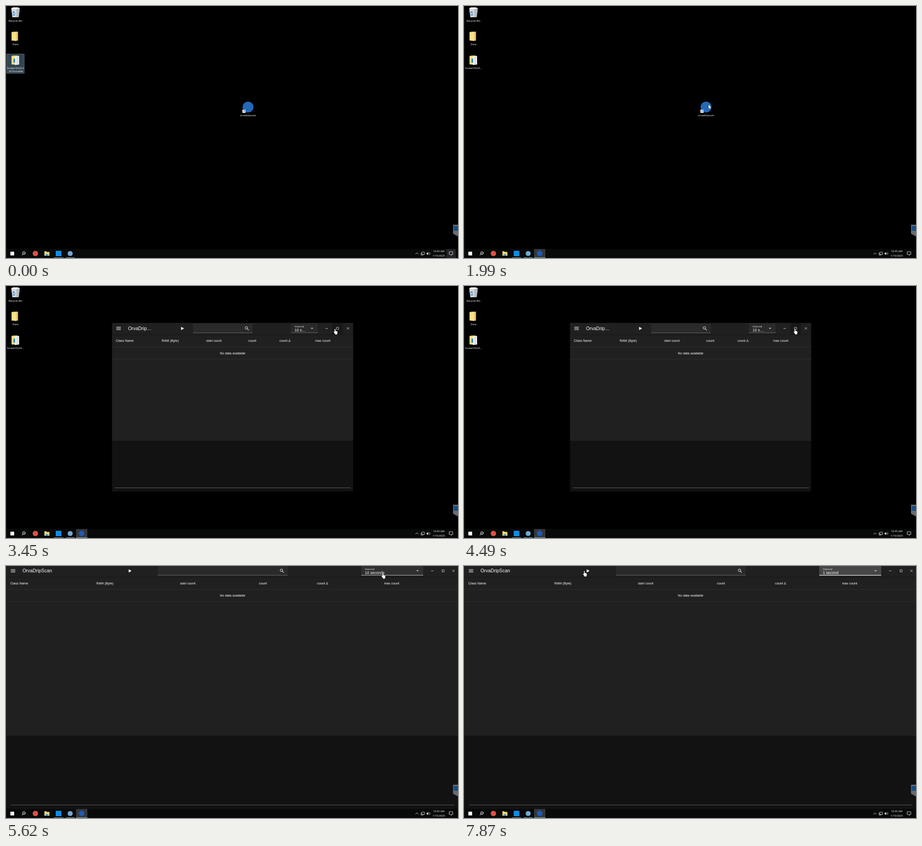
An HTML page with a canvas that plays this animation: 1000 by 560 pixels, repeating every 8000 ms.

```html
<!DOCTYPE html>
<html lang="en">
<head>
<meta charset="utf-8">
<title>Desktop app launch</title>
<style>
html, body { margin: 0; width: 100%; height: 100%; overflow: hidden; background: #000; }
canvas { display: block; }
</style>
</head>
<body>
<canvas id="stage" width="1000" height="560"></canvas>
<script>
const g = document.getElementById('stage').getContext('2d');
const LOOP = 8000;
const UI = '"Open Sans", "Noto Sans", sans-serif';
const APP = '"Liberation Sans", Arial, sans-serif';
const SURFACE = '#202020', BACK = '#121212', FIELD = '#2a2a2a', RULE = '#3a3a3a';
const NAME = 'OrvaDripScan';

const SMALL = {
  left: 1, right: 534.5, body: 260.5, bottom: 373, line: [7, 529.5, 365],
  cols: [9.5, 111, 209.5, 302.5, 371.5, 450.5], mid: 268,
  title: 'OrvaDrip…', play: 157, search: [180.5, 312], select: [397, 456], buttons: [476, 500, 523]
};
const WIDE = {
  left: 1, right: 1000, body: 377, bottom: 540, line: [11, 992, 531],
  cols: [9.5, 200, 385, 559.5, 688, 836.5], mid: 501.5,
  title: NAME, play: 274.5, search: [336, 623], select: [786, 923], buttons: [943, 967, 990]
};
const HEADS = ['Class Name', 'RAM (Byte)', 'start count', 'count', 'count Δ', 'max count'];
const CHOICES = ['1 second', '5 seconds', '10 seconds', '30 seconds', '60 seconds'];

// Pointer moves: [time, x, y]
const MOVES = [
  [[120, 955, 560], [400, 765, 420], [700, 510, 236], [890, 541, 219]],
  [[2720, 541, 219], [3000, 645.5, 153], [3250, 706, 112], [3510, 729, 94]],
  [[4170, 729, 94], [4230, 732, 95]],
  [[5140, 732, 95], [5450, 800, 40], [5750, 846, 7]],
  [[6250, 846, 7], [6680, 851, 34]],
  [[6860, 851, 34], [7150, 620, 24], [7520, 330, 14]],
  [[7620, 330, 14], [7750, 290, 17], [7870, 266, 11]]
];
const CLICKS = [[1230, 1310], [1400, 1480], [4390, 4490], [5930, 6020], [6730, 6780]];

const ARROW = new Path2D('M0 0V16.5L3.8 12.9 6.3 18.7 8.8 17.6 6.3 12H11.6Z');
const HAND = new Path2D('M6 .5c1.2 0 2 .8 2 2V8l6 1.5c1.6.4 2.5 1.3 2.5 3v3c0 2-1 3-1.5 4.5v2.5H7V21C5.5 19 3 16 1 13c-.8-1.5.8-2.6 2-1.6L4.5 13V2.5c0-1.2.5-2 1.5-2z');

const between = (t, a, b) => t >= a && t < b;
const clamp = v => Math.max(0, Math.min(1, v));
const ease = v => { v = clamp(v); return v * v * (3 - 2 * v); };

function rect(x, y, x2, y2, fill) {
  g.fillStyle = fill;
  g.fillRect(x, y, x2 - x, y2 - y);
}
function disc(x, y, r, fill) {
  g.fillStyle = fill;
  g.beginPath();
  g.arc(x, y, r, 0, 7);
  g.fill();
}
function poly(pts, fill) {
  g.fillStyle = fill;
  g.beginPath();
  for (let i = 0; i < pts.length; i += 2) g.lineTo(pts[i], pts[i + 1]);
  g.closePath();
  g.fill();
}
function stroke(path, color = '#fff', width = 0.8) {
  g.strokeStyle = color;
  g.lineWidth = width;
  g.stroke(new Path2D(path));
}
// y is the visual middle of the line
function text(s, x, y, size, font = APP, align = 'left', fill = '#fff', gap = 0) {
  g.font = size + 'px ' + font;
  g.letterSpacing = gap + 'px';
  g.textAlign = align;
  g.fillStyle = fill;
  g.fillText(s, x, y + size * 0.35);
}
const label = (s, x, y) => text(s, x, y, 5.9, UI, 'center');

function lens(x, y, r, color) {
  stroke(`M${x + r} ${y}A${r} ${r} 0 1 1 ${x - r} ${y}A${r} ${r} 0 1 1 ${x + r} ${y}`, color, 1.1);
}

function folder(x, y) {
  poly([x, y + 1, x + 5, y, x + 14, y, x + 14, y + 20, x, y + 20], '#e8c765');
  poly([x, y + 1, x + 10, y + 2, x + 10, y + 21, x, y + 19], '#fbe08c');
}

function bin() {
  poly([11.5, 5, 30.5, 5, 28, 25, 14, 25], '#d4d8db');
  poly([11.5, 5, 16, 3, 26, 3, 30.5, 5, 26, 7, 16, 7], '#f4f5f6');
  poly([23, 7, 30.5, 5, 28, 25, 23, 25], '#b4babf');
  stroke('M14.5 16.5l2.5-4 2.5 3M20 17.5l-2.3 3.3-3-1.8', '#2a83d0', 1.6);
}

function highlight(x, y, x2, y2) {
  rect(x, y, x2, y2, '#344450');
  g.strokeStyle = '#708491';
  g.lineWidth = 0.6;
  g.strokeRect(x + 0.3, y + 0.3, x2 - x - 0.6, y2 - y - 0.6);
}

function desktop(t) {
  rect(0, 0, 1000, 560, '#000');
  bin();
  label('Recycle Bin', 21, 32.5);
  folder(12.5, 57);
  label('Data', 21, 85);
  const picked = t < 1230;
  if (picked) highlight(1.5, 106.5, 40.5, 150);
  folder(12.5, 110);
  poly([20, 112, 29, 111, 29, 130, 20, 131], '#eef2f4');
  rect(16.5, 117, 20, 126, '#2b87d8');
  stroke('M23.5 115h3M23.5 119h3M23.5 123h3M23.5 127h3', '#7b8790', 0.9);
  if (picked) {
    label('ScreenToGif.2', 21, 137.7);
    label('.34.Portable', 21, 145.2);
  } else label('ScreenToGif...', 21, 137.7);

  if (between(t, 1230, 1990)) highlight(516, 211, 556, 248);
  disc(535.5, 224.5, 12, '#2468b8');
  rect(523, 230.5, 530, 237.5, '#f4f6f8');
  stroke('M524.7 236.3q0-3 3-3M526 232h2.6v2.6', '#1d5fb5', 0.9);
  label(NAME.toLowerCase(), 535.5, 243);
}

function taskbar(t) {
  rect(0, 540, 1000, 560, '#080909');
  if (t >= 1960) rect(155, 540, 180, 560, '#34373a');
  rect(9.7, 546, 18, 554.3, '#fff');
  lens(39.8, 549, 2.7, '#fff');
  stroke('M37.8 551l-2.7 2.9', '#fff', 1);
  disc(65, 550, 6, '#dd5142');
  poly([85, 545, 89, 545, 90, 546.5, 96, 546.5, 96, 555, 85, 555], '#f7d873');
  rect(87.5, 551, 93.5, 555, '#4aa3df');
  rect(110, 544, 122.5, 556, '#108be6');
  disc(142, 550, 5.6, '#6fa9d8');
  rect(106, 558.8, 126.5, 560, '#6f9dc0');
  rect(132, 558.8, 152, 560, '#6f9dc0');
  if (t >= 1960) {
    disc(167.3, 549.8, 6, '#1d5bb8');
    rect(155, 558.8, 180, 560, '#76a9d0');
  }
  stroke('M906 551.7l3.2-3.2 3.2 3.2', '#fff', 0.9);
  stroke('M919.8 547h6.2v4.8h-6.2zM918.3 548.5v5h4M922.8 552v2', '#ddd', 0.9);
  poly([930.3, 548.7, 932, 548.7, 934, 546.7, 934, 553.5, 932, 551.5, 930.3, 551.5], '#ddd');
  stroke('M935.3 548.3q1.3 1.8 0 3.6M937 547q2.2 3.1 0 6.2', '#ddd', 0.7);
  text('10:45 AM', 957.3, 545.3, 5.8, UI, 'center');
  text('1/15/2025', 957.5, 554.6, 5.7, UI, 'center');
  if (t < 1230) rect(974, 540, 995, 560, '#222324');
  stroke('M980.5 546h8v6h-3v2.3l-2.3-2.3h-2.7z', '#fff', 0.8);
}

function sideTab() {
  poly([990, 486, 1000, 486, 1000, 512, 989, 506, 989, 487], '#686c70');
  rect(990.5, 489, 1000, 499.5, '#174f80');
}

function selectBox(L, state) {
  const [a, b] = L.select, arrow = b - 12.5;
  rect(a, -1, b, 21, state.focus ? '#474747' : state.hover ? '#303030' : FIELD);
  rect(a, 20, b, state.focus ? 21.2 : 20.7, state.focus || state.hover ? '#fff' : '#858585');
  text('Interval', a + 8, 6.6, 6.25, APP, 'left', '#ddd', 0.06);
  text(state.value, a + 8, 14.7, 8.33, APP, 'left', '#fff', 0.078);
  const d = state.open ? -1.3 : 1.3;
  poly([arrow - 2.7, 10.7 - d, arrow + 2.7, 10.7 - d, arrow, 10.7 + d], '#ddd');
}

function appView(L, state) {
  rect(L.left, -1.5, L.right, L.body, SURFACE);
  rect(L.left, L.body, L.right, L.bottom, BACK);
  const shade = g.createLinearGradient(0, 24, 0, 27);
  shade.addColorStop(0, 'rgba(0,0,0,.28)');
  shade.addColorStop(1, 'rgba(0,0,0,0)');
  rect(L.left, 24, L.right, 27, shade);
  rect(L.left, 51.7, L.right, 52.3, RULE);
  rect(L.left, 78.8, L.right, 79.4, RULE);
  rect(L.line[0], L.line[2] - 0.4, L.line[1], L.line[2] + 0.4, '#777');

  for (const y of [7.9, 10.7, 13.5]) rect(10.7, y - 0.5, 20.5, y + 0.5, '#fff');
  text(L.title, 36.5, 10.8, 10.4);
  poly([L.play - 3, 7.2, L.play + 3.3, 10.8, L.play - 3, 14.5], '#fff');

  const [s0, s1] = L.search;
  rect(s0, 0, s1, 21, FIELD);
  rect(s0, 20.2, s1, 20.9, '#858585');
  lens(s1 - 13.7, 9.5, 2.7, '#ddd');
  stroke(`M${s1 - 11.7} 11.6l3.2 3.2`, '#ddd', 1.3);

  selectBox(L, state);

  const [min, max, close] = L.buttons;
  if (state.maxHover) rect(max - 11.8, -1, max + 11.8, 23.5, '#181818');
  stroke(`M${min - 2.6} 10.8h5.2M${max - 2.4} 8.4h4.8v4.8h-4.8zM${close - 2.4} 8.3l4.8 4.8M${close + 2.4} 8.3l-4.8 4.8`, '#eee', 0.8);

  HEADS.forEach((s, i) => text(s, L.cols[i], 38, 7.29));
  text('No data available', L.mid, 65.5, 7.29, APP, 'center');
}

function menu(t, hovered) {
  const show = Math.min(ease((t - 6020) / 180), 1 - ease((t - 6830) / 130));
  if (show <= 0) return;
  const size = 0.85 + 0.15 * show;
  g.save();
  g.globalAlpha = show;
  g.translate(854.5, 25);
  g.scale(size, size);
  g.translate(-854.5, -25);
  g.shadowColor = 'rgba(0,0,0,.55)';
  g.shadowBlur = 6;
  g.shadowOffsetY = 2;
  rect(786, 21.5, 923, 155, '#202020');
  g.shadowColor = 'transparent';
  if (hovered) rect(786, 25.3, 923, 50.4, '#2a2a2a');
  const chosen = t < 6800 ? 2 : 0;
  rect(786, 25.3 + chosen * 25, 923, 50.3 + chosen * 25, '#3c3c3c');
  CHOICES.forEach((s, i) => text(s, 794, 37.8 + i * 25, 8.33, APP, 'left', '#fff', 0.078));
  g.restore();
}

function pointer(t) {
  let at = [955, 570];
  for (const m of MOVES) {
    const n = m.length - 1;
    if (t < m[0][0]) break;
    if (t >= m[n][0]) { at = m[n].slice(1); continue; }
    const i = m.findIndex((p, k) => k < n && t < m[k + 1][0]);
    const p = m[i], q = m[i + 1], span = q[0] - p[0], u = (t - p[0]) / span;
    // Hermite curve that rests at both ends of the move
    const slope = (k, c) => k === 0 || k === n ? 0 : (m[k + 1][c] - m[k - 1][c]) / (m[k + 1][0] - m[k - 1][0]);
    at = [1, 2].map(c => {
      const e = ease(u);
      return p[c] * (1 - e) + q[c] * e
        + span * (u * (1 - u) ** 2 * slope(i, c) - u * u * (1 - u) * slope(i + 1, c));
    });
  }
  return at;
}

function drawPointer(x, y, hand, pressed) {
  if (pressed) disc(x, y + 0.3, 7, 'rgba(215,203,0,.74)');
  g.save();
  g.translate(hand ? x - 3.1 : x, y);
  g.scale(0.53, 0.56);
  const shape = hand ? HAND : ARROW;
  g.lineWidth = 1.6;
  g.strokeStyle = '#000';
  g.stroke(shape);
  g.fillStyle = '#fff';
  g.fill(shape);
  g.restore();
}

function windowed(t, state) {
  if (t < 3200) {
    const part = t < 2320;
    g.save();
    g.globalAlpha = part ? 0.5 : 1;
    const inset = part ? 10 : 0;
    rect(234.5 + inset, 81.7 + inset, 768 - inset, 456.5 - inset, '#fff');
    g.restore();
    return;
  }
  const grow = t < 4520 ? 0 : t < 4570 ? 0.6 : 1;
  const dx = 233.5 * (1 - grow), dy = 83.5 * (1 - grow);
  if (grow) rect(dx + 1, Math.max(0, dy - 1.5), 768 + 232 * grow, 456.5 + 83.5 * grow, BACK);
  g.save();
  g.translate(dx, dy);
  appView(SMALL, state);
  g.restore();
}

function tooltip() {
  rect(734, 102, 768, 115, '#767676');
  rect(734.5, 102.5, 767.5, 114.5, '#fff');
  text('Maximize', 751, 108.5, 6, UI, 'center', '#575757');
}

function draw(t) {
  const [x, y] = pointer(t);
  const wide = t >= 4600;
  const overSelect = wide && x > 786 && x < 923 && y < 21;
  const overMax = between(t, 3200, 4570) && x > 721 && x < 746 && y < 107;
  const menuOpen = between(t, 6020, 6830);
  const overItem = menuOpen && y > 25;
  const overPlay = wide && x < 286 && y < 24;
  const state = {
    value: !wide ? '10 s…' : t < 6800 ? '10 seconds' : '1 second',
    focus: t >= 5930, hover: overSelect, open: menuOpen,
    maxHover: overMax || between(t, 4570, 4600)
  };
  desktop(t);
  if (wide) {
    appView(WIDE, state);
    menu(t, overItem);
  } else if (t >= 2270) windowed(t, state);
  if (between(t, 4010, 4170)) tooltip();
  taskbar(t);
  sideTab();
  rect(0, 0, 1, 560, '#1c1c1c');
  const pressed = CLICKS.some(c => between(t, c[0], c[1]));
  drawPointer(x, y, overMax || overSelect || overItem || overPlay, pressed);
}

let start;
function tick(now) {
  if (start === undefined) start = now;
  draw((now - start) % LOOP);
  requestAnimationFrame(tick);
}
draw(0);
requestAnimationFrame(tick);
</script>
</body>
</html>
```
